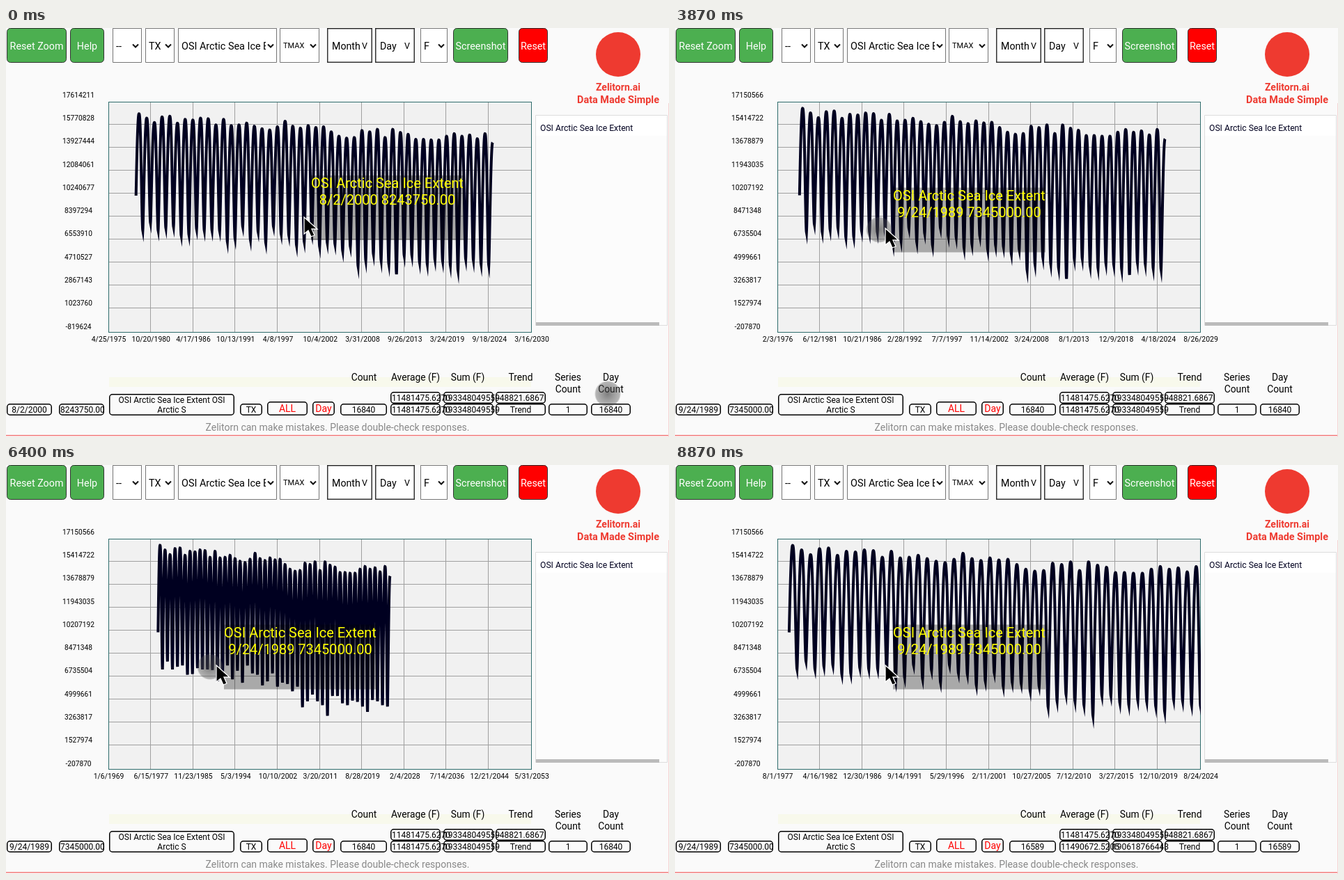
An HTML page with a canvas that plays this animation: 952x588 px, repeating every 9.4 s.

```html
<!DOCTYPE html>
<html lang="en">
<head>
<meta charset="utf-8">
<title>Sea ice chart</title>
<style>
html, body { margin: 0; width: 100%; height: 100%; overflow: hidden; background: #fafafa }
canvas { display: block }
</style>
</head>
<body>
<canvas id="stage" width="952" height="588"></canvas>
<script>
const c = document.getElementById('stage').getContext('2d');
const LOOP = 9400, STEP = 1000 / 15;
const NAVY = '#000020', RED = '#ff0000', GREEN = '#4caf50', FACE = 'Roboto, Arial, sans-serif';
const SERIES = 'OSI Arctic Sea Ice Extent';
const PLOT = { x: 148, y: 106, w: 606, h: 331 };

// Days are counted from BASE, values in square km
const BASE = Date.UTC(1976, 6, 9), BASE_YEAR = 1976.52, DAY = 864e5;
const VIEW_DAYS = 18879, VIEW_TOP = 17150566, VIEW_HEIGHT = 17358436;
const LAST_DAY = 17829, FIRST_YEAR = 1978.815, LAST_YEAR = 2025.335;

// Yearly winter maxima from 1979 and summer minima from 1978, in millions
const highs = [16.65, 16.3, 15.95, 16.4, 16.45, 15.9, 16.2, 16.15, 16.3, 16.25, 15.75, 16.2, 15.7, 15.75,
  15.9, 15.65, 15.45, 15.35, 15.6, 16.05, 15.65, 15.5, 15.7, 15.55, 15.6, 15.2, 14.85, 14.7, 14.75, 15.3,
  15.2, 15.4, 14.75, 15.4, 15.15, 15, 14.6, 14.6, 14.55, 14.55, 14.85, 15.05, 14.85, 14.95, 14.65, 15.05, 14.35];
const lows = [7.3, 7.3, 7.9, 7.3, 7.5, 7.6, 6.9, 6.95, 7.4, 7.3, 7.3, 7.25, 6.4, 6.65, 7.6, 6.55, 7.2, 6.3,
  7.6, 7, 6.9, 6.1, 6.4, 7, 6, 6.3, 6.2, 5.65, 6, 4.45, 4.9, 5.4, 4.9, 4.6, 3.8, 5.3, 5.3, 4.75, 4.6, 4.95,
  4.85, 4.5, 4.1, 5, 4.9, 4.6, 4.5];

// [ms, visible days]
const zoomKeys = [[1200, 20048.60181], [1400, 23357.2032], [1533, 23357.2032], [1933, 18879],
  [3800, 18879], [4000, 20930], [4400, 17620], [4600, 17620], [4667, 16728], [5133, 23600], [5333, 23600],
  [5400, 24955], [5867, 31400], [6333, 31400], [6800, 27400], [6933, 27400], [7200, 24394],
  [7667, 18480], [7800, 18480], [8067, 17190]];

// [ms, x, y] of the pointer halo
const haloKeys = [[0, 864, 526], [533, 423, 278], [733, 423, 278], [933, 384, 255], [2000, 384, 255],
  [2133, 325, 230], [2733, 325, 230], [3000, 310, 300], [3200, 310, 300], [3733, 293, 290],
  [8400, 293, 290], [8867, 246, 610]];

const hovers = [
  { from: 0, date: '8/2/2000', value: '8243750.00', tip: [438, 212], arrow: [428, 272], color: NAVY, width: 4 },
  { from: 2060, date: '7/3/1991', value: '11030000.00', tip: [332, 208.5], arrow: [320, 218], color: RED, width: 6 },
  { from: 3260, date: '9/24/1989', value: '7345000.00', tip: [313, 229.5], arrow: [302, 288], color: NAVY, width: 4 }
];

function tween(keys, t) {
  const i = keys.findIndex(k => k[0] > t);
  if (i === 0) return keys[0].slice(1);
  if (i < 0) return keys[keys.length - 1].slice(1);
  const a = keys[i - 1], b = keys[i], u = (t - a[0]) / (b[0] - a[0]);
  return a.slice(1).map((v, j) => v + (b[j + 1] - v) * u);
}

function view(t) {
  const days = tween(zoomKeys, t)[0], early = t < 2500;
  const start = (early ? -0.37705 : -0.22944) * (days - VIEW_DAYS);
  const height = early ? VIEW_HEIGHT * days / VIEW_DAYS : VIEW_HEIGHT;
  return { days, start, height, top: VIEW_TOP + 0.4311377 * (height - VIEW_HEIGHT) };
}

function extent(time) {
  const year = Math.floor(time), f = time - year, i = year - 1979;
  const swing = (from, to, u) => from + (to - from) * (1 - Math.cos(Math.PI * u)) / 2;
  if (f < 0.2) return swing(lows[i], highs[i], ((f + 0.3) / 0.5) ** 0.68);
  if (f < 0.7) return swing(highs[i], lows[i + 1], ((f - 0.2) / 0.5) ** 1.35);
  return swing(lows[i + 1], highs[i + 1], ((f - 0.7) / 0.5) ** 0.68);
}

// y is the middle of the capitals
function text(s, x, y, size, color = '#000', align = 'center', weight = '') {
  c.font = `${weight} ${size}px ${FACE}`;
  c.textAlign = align;
  c.fillStyle = color;
  c.fillText(s, x, y + size * 0.355);
}

function box(x, y, x2, y2, fill, stroke, radius = 0, line = 1) {
  c.beginPath();
  c.roundRect(x + line / 2, y + line / 2, x2 - x - line, y2 - y - line, radius);
  c.fillStyle = fill;
  c.fill();
  c.strokeStyle = stroke;
  c.lineWidth = line;
  c.stroke();
}

function button(x, x2, label, fill) {
  box(x, 0, x2, 50, fill, '#333', 5);
  text(label, (x + x2) / 2, 25.5, 14.3, '#fff');
}

function select(x, x2, label, size = 14.4) {
  box(x, 0, x2, 50, '#fff', '#767676');
  c.save();
  c.beginPath();
  c.rect(x, 0, x2 - x - 16, 50);
  c.clip();
  text(label, x + 5, 25.5, size, '#000', 'left');
  c.restore();
  const m = x2 - 9;
  c.beginPath();
  c.moveTo(m - 4, 23.5);
  c.lineTo(m, 27.5);
  c.lineTo(m + 4, 23.5);
  c.strokeStyle = '#111';
  c.lineWidth = 2;
  c.stroke();
}

function picker(x, x2, label) {
  box(x, 0, x2, 50, '#fff', '#333', 0, 1.5);
  text(label, x + 7, 25.5, 14.2, '#000', 'left');
  text('V', x2 - 11, 25.5, 12.5);
}

function frame(x, x2, y, y2) {
  box(x, y, x2, y2, '#fafafa', '#000', 4, 1.5);
}

function field(x, x2, label, align = 'center') {
  frame(x, x2, 540, 557);
  text(label, align === 'left' ? x + 2 : (x + x2) / 2, 548.5, 12, '#000', align);
}

function toolbar() {
  button(1, 87, 'Reset Zoom', GREEN);
  button(92, 141, 'Help', GREEN);
  select(153, 195, '--');
  select(200, 242, 'TX');
  select(247, 389, SERIES);
  select(393, 450, 'TMAX', 11);
  picker(461, 526, 'Month');
  picker(530, 587, 'Day');
  select(595, 634, 'F');
  button(642, 721, 'Screenshot', GREEN);
  button(736, 778, 'Reset', RED);
  c.beginPath();
  c.arc(879, 38, 32, 0, 7);
  c.fillStyle = '#ee3a30';
  c.fill();
  text('Zelitorn.ai', 879, 85.5, 14, '#ee3a30', 'center', 'bold');
  text('Data Made Simple', 879, 102.5, 14.4, '#ee3a30', 'center', 'bold');
}

function legend(color) {
  box(760, 125, 950, 428, '#fcfcfc', '#ddd');
  c.fillStyle = '#fff';
  c.fillRect(761, 126, 188, 29);
  text(SERIES, 767, 143.5, 12.2, color, 'left');
  c.fillStyle = '#bbb';
  c.fillRect(761, 423, 177, 5);
}

function chart(v, hover) {
  c.fillStyle = '#f1f1f1';
  c.fillRect(PLOT.x, PLOT.y, PLOT.w, PLOT.h);
  c.strokeStyle = '#a0a0a0';
  c.lineWidth = 1;
  c.beginPath();
  for (let i = 1; i < 10; i++) {
    const x = Math.floor(PLOT.x + PLOT.w * i / 10) - 0.5, y = Math.floor(PLOT.y + PLOT.h * i / 10) - 0.5;
    c.moveTo(x, PLOT.y);
    c.lineTo(x, PLOT.y + PLOT.h);
    c.moveTo(PLOT.x, y);
    c.lineTo(PLOT.x + PLOT.w, y);
  }
  c.stroke();
  c.strokeStyle = '#2f6c6c';
  c.strokeRect(147.5, 106.5, 607, 331);

  for (let i = 0; i <= 10; i++) {
    const d = new Date(BASE + Math.round(v.start + v.days * i / 10) * DAY);
    const label = `${d.getUTCMonth() + 1}/${d.getUTCDate()}/${d.getUTCFullYear()}`;
    text(label, 147.5 + 60.75 * i, 447, 10.4);
    text(Math.round(v.top - v.height * i / 10), 104, 96 + 33.3 * i, 10.2);
  }

  c.save();
  c.beginPath();
  c.rect(PLOT.x, PLOT.y, PLOT.w + 1, PLOT.h);
  c.clip();
  c.beginPath();
  for (let time = FIRST_YEAR; time <= LAST_YEAR; time += 1 / 60) {
    const day = (time - BASE_YEAR) * 365.25;
    c.lineTo(PLOT.x + (day - v.start) / v.days * PLOT.w,
      PLOT.y + (v.top - extent(time) * 1e6) / v.height * PLOT.h);
  }
  c.strokeStyle = hover.color;
  c.lineWidth = hover.width;
  c.stroke();
  c.restore();
}

function stats(y, mean, sum, trend) {
  for (const x of [552, 628, 703]) frame(x, x + 72, y, y + 17);
  text(mean, 554, y + 8.5, 12, '#000', 'left');
  text(sum, 628, y + 8.5, 12, '#000', 'left');
  text(trend, 739, y + 8.5, 12);
}

function readouts(t, hover) {
  // The totals lag slightly behind the zoom
  const v = view(t - 130);
  const cut = Math.round(Math.max(0, LAST_DAY - Math.round(v.start + v.days)));
  const count = 16840 - cut, mean = 11481475.627 + cut * 36.64101;

  c.fillStyle = '#f8f9ec';
  c.fillRect(148, 502, 606, 14);
  const heads = [['Count', 514], ['Average (F)', 588], ['Sum (F)', 663], ['Trend', 739], ['Series', 807], ['Day', 868.5]];
  heads.forEach(([s, x]) => text(s, x, 502, 13.8));
  text('Count', 807, 519, 13.8);
  text('Count', 868.5, 519, 13.8);

  field(1, 66, hover.date);
  field(76, 141, hover.value, 'left');
  frame(148, 328, 526, 557);
  text(SERIES + ' OSI', 238, 534.5, 12);
  text('Arctic S', 238, 548.5, 12);
  field(336, 368, 'TX');
  frame(375, 433, 537, 557);
  text('ALL', 404, 547, 14, RED);
  frame(440, 472, 537, 557);
  text('Day', 456, 547, 14, RED);
  field(480, 547, count);
  stats(523, '11481475.6270', '193348049559', '-48821.6867');
  stats(540, mean.toFixed(4), Math.round(count * mean), 'Trend');
  field(779, 835, '1');
  field(840, 897, count);

  text('Zelitorn can make mistakes. Please double-check responses.', 476, 574, 14, '#888');
  c.fillStyle = '#f47c7c';
  c.fillRect(0, 585, 952, 1.5);
  c.fillStyle = '#f6d5d5';
  c.fillRect(951, 108, 1, 480);
}

function tooltip({ tip: [x, y], date, value }) {
  c.fillStyle = 'rgba(0,0,0,.3)';
  c.fillRect(x, y, 219, 93);
  text(SERIES, x + 109.5, y + 11, 20, '#ff0');
  text(`${date} ${value}`, x + 109.5, y + 35, 20, '#ff0');
}

function halo([x, y]) {
  const g = c.createRadialGradient(x, y, 0, x, y, 19);
  g.addColorStop(0, 'rgba(60,60,60,.65)');
  g.addColorStop(0.5, 'rgba(70,70,70,.5)');
  g.addColorStop(0.9, 'rgba(80,80,80,.4)');
  g.addColorStop(1, 'rgba(80,80,80,0)');
  c.fillStyle = g;
  c.fillRect(x - 19, y - 19, 38, 38);
}

function arrow([x, y]) {
  const shape = [[0, 0], [0, 24], [6, 19], [10, 28], [15, 26], [11, 17], [19, 17]];
  c.beginPath();
  shape.forEach(([dx, dy]) => c.lineTo(x + dx, y + dy));
  c.closePath();
  c.fillStyle = '#000';
  c.fill();
  c.strokeStyle = '#fff';
  c.lineWidth = 1.3;
  c.stroke();
}

function draw(now) {
  // Time advances in fifteenths of a second
  const t = Math.floor((now % LOOP + 4) / STEP) * STEP;
  const hover = hovers.filter(h => h.from <= t).pop();
  c.fillStyle = '#fafafa';
  c.fillRect(0, 0, 952, 588);
  toolbar();
  legend(hover.color);
  chart(view(t), hover);
  readouts(t, hover);
  tooltip(hover);
  halo(tween(haloKeys, t));
  arrow(hover.arrow);
}

const began = performance.now();
(function tick() {
  draw(performance.now() - began);
  requestAnimationFrame(tick);
})();
</script>
</body>
</html>
```
